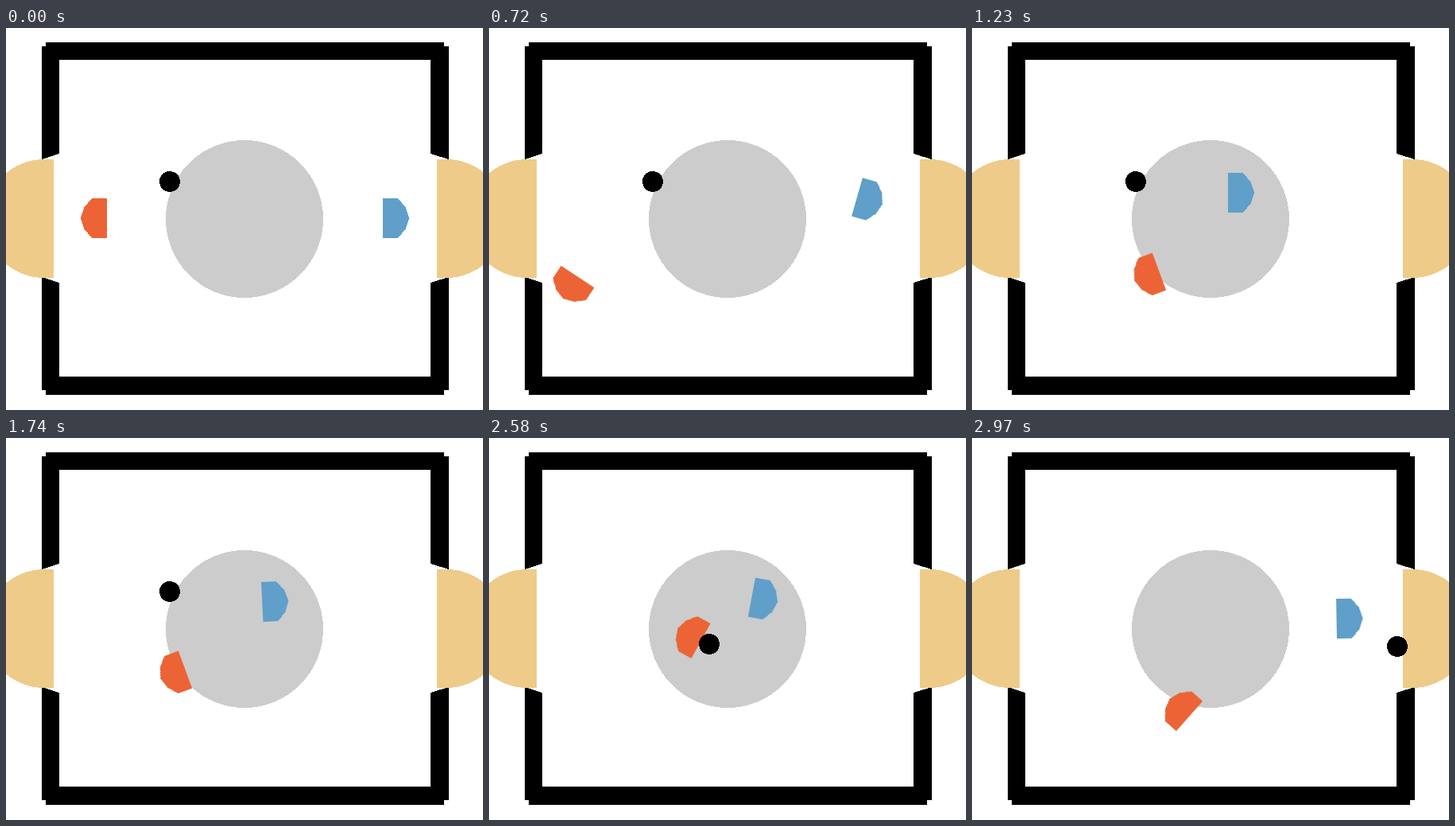
Animation of 600x480 px, one loop 3 s. Source, as an HTML page without scripts:

```html
<!DOCTYPE html>
<html lang="en">
<head>
<meta charset="utf-8">
<title>Table match</title>
<style>
html, body { margin: 0; width: 100%; height: 100%; overflow: hidden; background: #fff; }
svg { display: block; width: 600px; height: 480px; shape-rendering: crispEdges; }
.goal { fill: #eecb88; }
.red { fill: #ec6435; animation: red 3s infinite; }
.blue { fill: #5f9fc9; animation: blue 3s infinite; }
.ball { animation: ball 3s infinite; }

/* One percent is one 30 ms tick; each steps() count is the ticks to the next pose. */
@keyframes red {
  0% { transform: translate(112px, 239px) rotate(0deg); animation-timing-function: steps(18); }
  18% { transform: translate(112px, 305px) rotate(-42deg); animation-timing-function: steps(6); }
  24% { transform: translate(103.3px, 325px) rotate(-56.6deg); animation-timing-function: steps(12); }
  36% { transform: translate(180px, 312px) rotate(-28deg); animation-timing-function: steps(5); }
  41% { transform: translate(221.4px, 311.2px) rotate(-20.3deg); animation-timing-function: steps(17); }
  58% { transform: translate(211.4px, 296.2px) rotate(-20.3deg); animation-timing-function: steps(7); }
  65% { transform: translate(184px, 270px) rotate(-18deg); animation-timing-function: steps(7); }
  72% { transform: translate(202px, 235px) rotate(-14deg); animation-timing-function: steps(3); }
  75% { transform: translate(226.3px, 218.1px) rotate(-11.8deg); animation-timing-function: steps(5); }
  80% { transform: translate(222px, 224px) rotate(8deg); animation-timing-function: steps(6); }
  86% { transform: translate(253.4px, 247.8px) rotate(28.7deg); animation-timing-function: steps(4); }
  90% { transform: translate(246px, 270px) rotate(41deg); animation-timing-function: steps(9); }
  99%, 100% { transform: translate(262.3px, 339.5px) rotate(41.7deg); animation-timing-function: step-end; }
}
@keyframes blue {
  0% { transform: translate(489px, 239px) rotate(0deg); animation-timing-function: steps(18); }
  18% { transform: translate(512px, 222px) rotate(8deg); animation-timing-function: steps(6); }
  24% { transform: translate(477.4px, 216.5px) rotate(16deg); animation-timing-function: steps(12); }
  36% { transform: translate(353px, 210px) rotate(3deg); animation-timing-function: steps(5); }
  41% { transform: translate(337px, 207px) rotate(0deg); animation-timing-function: steps(17); }
  58% { transform: translate(337.2px, 205.3px) rotate(-2.9deg); animation-timing-function: steps(17); }
  75% { transform: translate(339.1px, 203.3px) rotate(12.9deg); animation-timing-function: steps(11); }
  86% { transform: translate(345.2px, 202.8px) rotate(10.6deg); animation-timing-function: steps(4); }
  90% { transform: translate(379px, 207px) rotate(5deg); animation-timing-function: steps(9); }
  99%, 100% { transform: translate(473.5px, 226.8px) rotate(-1deg); animation-timing-function: step-end; }
}
@keyframes ball {
  0% { transform: translate(206px, 193px); animation-timing-function: step-end; }
  73% { transform: translate(206px, 193px); animation-timing-function: steps(2); }
  75% { transform: translate(206px, 182px); animation-timing-function: steps(5); }
  80% { transform: translate(248px, 228px); animation-timing-function: steps(6); }
  86% { transform: translate(277px, 259px); animation-timing-function: steps(1); }
  87% { transform: translate(288px, 270px); animation-timing-function: steps(3); }
  90% { transform: translate(384px, 374px); animation-timing-function: steps(1); }
  91% { transform: translate(412px, 405px); animation-timing-function: steps(1); }
  92% { transform: translate(432px, 416px); animation-timing-function: steps(7); }
  99%, 100% { transform: translate(535px, 262px); animation-timing-function: step-end; }
}
</style>
</head>
<body>
<svg viewBox="0 0 600 480">
  <rect width="600" height="480" fill="#fff"/>
  <circle cx="300" cy="240" r="99" fill="#ccc"/>
  <!-- walls -->
  <path d="M50 18H551V40H50Z M50 438H551V461H50Z"/>
  <path d="M45 23H67V158L45 165Z M45 313L67 320V455H45Z"/>
  <path d="M557 23H534V158L557 165Z M557 313L534 320V455H557Z"/>
  <!-- goals -->
  <path class="goal" d="M60 165H48A74.5 74.5 0 0 0 48 314H60Z"/>
  <path class="goal" d="M542 165H554A74.5 74.5 0 0 1 554 314H542Z"/>
  <!-- players -->
  <path class="red" d="M15-25H-4L-14-13L-18 0L-14 13L-4 25H15Z"/>
  <path class="blue" d="M-15-25H4L14-13L18 0L14 13L4 25H-15Z"/>
  <circle class="ball" r="13"/>
</svg>
</body>
</html>
```
